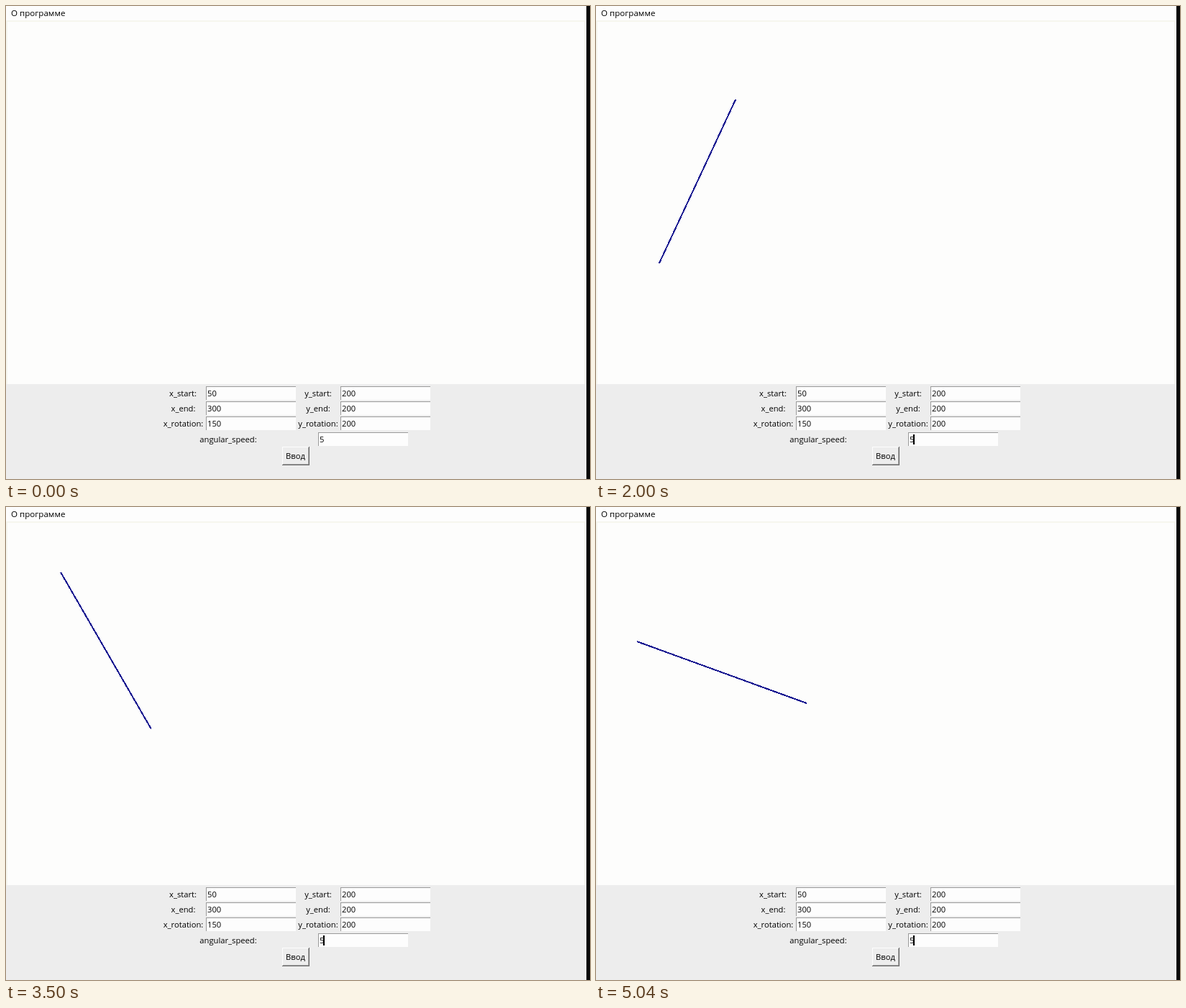
An HTML page for the animation above (5070 ms loop, 812x658 px).

```html
<!DOCTYPE html>
<html lang="ru">
<head>
<meta charset="utf-8">
<title>Вращение отрезка</title>
<style>
  html, body { margin: 0; width: 100%; height: 100%; overflow: hidden; background: #ededed; }
  svg { display: block; width: 812px; height: 658px; }
  text { font: 11.2px "Open Sans", "Noto Sans", sans-serif; fill: #000; }
  .menu { font-size: 11.6px; }
  .label { text-anchor: middle; }
  rect, path, line { shape-rendering: crispEdges; }
  #rod { stroke: #14148f; stroke-width: 2; stroke-linecap: round; }
</style>
</head>
<body>
<svg id="stage" viewBox="0 0 812 658">
  <rect width="812" height="658" fill="#ededed"/>
  <rect width="806" height="20" fill="#fdfdfd"/>
  <rect y="20" width="806" height="506" fill="#f6f6ee"/>
  <rect x="2" y="22" width="802" height="504" fill="#fdfdfc"/>
  <rect x="807" width="5" height="658" fill="#080808"/>
  <text class="menu" x="7" y="14">О программе</text>
  <svg x="2" y="22" width="802" height="504" viewBox="2 22 802 504">
    <line id="rod"/>
  </svg>
  <g id="form"></g>
  <g>
    <rect x="384" y="613" width="38" height="26" fill="#696969"/>
    <rect x="384" y="613" width="37" height="25" fill="#fdfdfd"/>
    <rect x="385" y="614" width="36" height="24" fill="#a0a0a0"/>
    <rect x="385" y="614" width="35" height="23" fill="#ededed"/>
    <text class="label" x="402.5" y="630">Ввод</text>
  </g>
  <rect id="caret" x="441" y="596" width="2" height="14" fill="#000"/>
</svg>
<script>
const LOOP = 5070, FRAME = 33.3636;
const PIVOT = { x: 151.5, y: 221.5 }, START_ARM = 100, END_ARM = 150;
const STEP_DEG = 5;

// The timer drifts a little: [tick, rotation steps done by then]
const PACE = [[15, 0], [32, 36], [60, 95], [90, 159], [120, 225], [141, 270], [151, 292]];

const rod = document.getElementById('rod');
const caret = document.getElementById('caret');
const form = document.getElementById('form');

function field(label, labelX, value, x, y) {
  form.insertAdjacentHTML('beforeend', `
    <text class="label" x="${labelX}" y="${y + 14}">${label}</text>
    <rect x="${x}" y="${y}" width="125" height="19" fill="#fdfdfd"/>
    <path d="M${x + 0.5} ${y + 19}V${y + 0.5}H${x + 125}" fill="none" stroke="#9a9a9a"/>
    <text x="${x + 2}" y="${y + 14}">${value}</text>`);
}

field('x_start:', 246, 50, 278, 529);
field('y_start:', 434, 200, 465, 529);
field('x_end:', 246.5, 300, 278, 550);
field('y_end:', 434, 200, 465, 550);
field('x_rotation:', 246.5, 150, 278, 571);
field('y_rotation:', 434, 200, 465, 571);
field('angular_speed:', 309, 5, 434, 593);

const tickTime = k => Math.round(k * FRAME / 10) * 10;

function tickAt(t) {
  let k = Math.floor(t / FRAME) + 1;
  while (tickTime(k) > t) k--;
  return k;
}

function stepsAt(tick) {
  const i = Math.max(1, PACE.findIndex(([k]) => k >= tick));
  const [k0, n0] = PACE[i - 1], [k1, n1] = PACE[i];
  return Math.round(n0 + (n1 - n0) * (tick - k0) / (k1 - k0));
}

function drawRod(tick) {
  const running = tick >= PACE[0][0];
  rod.setAttribute('visibility', running ? 'visible' : 'hidden');
  if (!running) return;
  const a = stepsAt(tick) * STEP_DEG * Math.PI / 180;
  const c = Math.cos(a), s = Math.sin(a);
  rod.setAttribute('x1', PIVOT.x - START_ARM * c);
  rod.setAttribute('y1', PIVOT.y - START_ARM * s);
  rod.setAttribute('x2', PIVOT.x + END_ARM * c);
  rod.setAttribute('y2', PIVOT.y + END_ARM * s);
}

function draw() {
  const t = performance.now() % LOOP;
  drawRod(Math.min(tickAt(t), 151));
  const caretOn = (t + 855) % 950 < 633;
  caret.setAttribute('visibility', caretOn ? 'visible' : 'hidden');
  requestAnimationFrame(draw);
}
draw();
</script>
</body>
</html>
```
